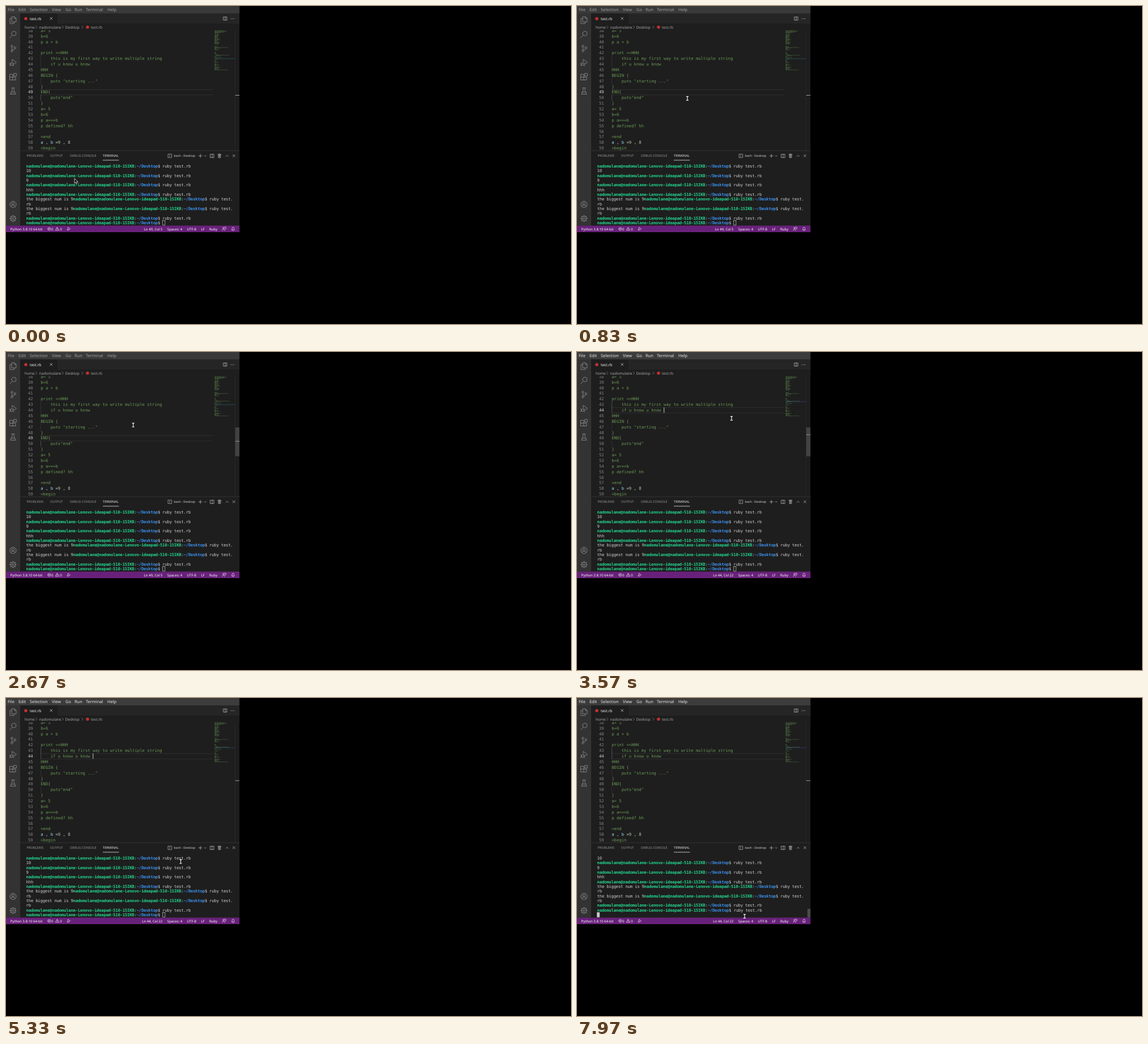
An HTML page that plays this animation: 998x561 px, repeating every 8 s.

```html
<!DOCTYPE html>
<html lang="en">
<head>
<meta charset="utf-8">
<title>Editor session</title>
<style>
  html, body { margin: 0; width: 100%; height: 100%; overflow: hidden; background: #000; }
  svg { display: block; width: 998px; height: 561px; }
  text { white-space: pre; text-rendering: geometricPrecision; font-family: "Noto Sans", sans-serif; }
  .mono { font-family: "DejaVu Sans Mono", monospace; font-size: 7.28px; }
  .term { letter-spacing: -0.225px; fill: #ccc; }
  .icon { fill: none; stroke-linecap: round; stroke-linejoin: round; }
</style>
</head>
<body>
<svg id="stage" viewBox="0 0 998 561"></svg>
<script>
const LOOP = 8000;
const USER = "nadomulane";
const stage = document.getElementById("stage");

function el(tag, attrs = {}, parent = stage) {
  const node = document.createElementNS("http://www.w3.org/2000/svg", tag);
  for (const key in attrs) node.setAttribute(key, attrs[key]);
  return parent.appendChild(node);
}
const group = (parent = stage) => el("g", {}, parent);
const rect = (x, y, width, height, fill, parent) => el("rect", { x, y, width, height, fill }, parent);
const path = (d, stroke, width = 0.6, parent = stage) =>
  el("path", { d, stroke, "stroke-width": width, class: "icon" }, parent);
function icon(x, y, d, stroke, width) {
  return el("path", { d, stroke, "stroke-width": width, class: "icon", transform: `translate(${x} ${y})` });
}
function label(x, y, string, size, fill, attrs = {}) {
  const node = el("text", { x, y, "font-size": size, fill, ...attrs });
  node.textContent = string;
  return node;
}
function mono(x, y, spans, parent, cls = "mono") {
  const node = el("text", { x, y, class: cls }, parent);
  for (const [string, fill, weight = 400] of spans)
    el("tspan", { fill, "font-weight": weight }, node).textContent = string;
  return node;
}
const ring = (x, y, r) => `M${x - r} ${y}a${r} ${r} 0 1 0 ${2 * r} 0a${r} ${r} 0 1 0 ${-2 * r} 0`;

// ---- Editor ----
const FIRST = 38, ROW = 9.876, CHAR = 4.383, LEFT = 61.2;
const GREEN = "#6a9955", BLUE = "#9cdcfe", PLAIN = "#d4d4d4", NUMBER = "#b5cea8";
const code = [
  "a= 5", "b=6", "p a + b", "", "print <<HHH",
  "    this is my first way to write multiple string", "    if u know u know ", "HHH",
  "BEGIN {", "    puts \"starting ...\"", "}", "END{", "    puts\"end\"", "}",
  "a= 5", "b=6", "p a===b", "p defined? hh", "", "=end", "a , b =9 , 8", "=begin"
];
const rowTop = n => 48.2 + (n - 39) * ROW;

rect(0, 0, 412.3, 399, "#1e1e1e");
const lineBox = path(`M${LEFT} .5H365M${LEFT} ${ROW}H365`, "#303032", 0.9);

const guide = n => path(`M61.6 ${rowTop(n)}v${ROW}`, "#404040", 0.6);
const guides = { 43: guide(43), 44: guide(44), 47: guide(47), 50: guide(50) };

const numbers = {};
code.forEach((string, i) => {
  const n = FIRST + i, y = rowTop(n) + 7.5;
  numbers[n] = mono(39, y, [[n, "inherit"]]);
  const spans = n === 58
    ? [["a", BLUE], [" , ", PLAIN], ["b", BLUE], [" =", PLAIN], ["9", NUMBER], [" , ", PLAIN], ["8", NUMBER]]
    : [[string, GREEN]];
  mono(LEFT, y, spans);
});
const caret = rect(LEFT + 21 * CHAR, rowTop(44) + 0.2, 1, ROW - 0.4, "#c8c8c6");

// ---- Minimap and ruler ----
let seed = 11;
const random = () => (seed = (seed * 16807) % 2147483647) / 2147483647;
const mapTop = n => 42.6 + (n - 1) * 1.04;
const mapLine = rect(368.5, 0, 36, 0.9, "#28515a");
for (let n = 1; n <= 68; n++) {
  const string = code[n - FIRST];
  const blank = n === 7 || (n > 24 && n < 28) || (n > 34 && n < 38) || n === 62;
  const length = string !== undefined ? string.trim().length
    : blank ? 0 : n < 5 ? 30 + random() * 22 : n === 30 || n === 68 ? 46 : 6 + random() * 16;
  const indent = string && string[0] === " " ? 4 : 0;
  if (length) el("path", {
    d: `M${368.5 + indent * 0.52} ${mapTop(n) + 0.5}h${length * 0.52}`,
    stroke: GREEN, "stroke-width": 0.75, "stroke-dasharray": "2.4 .5 1.3 .4", opacity: 0.6
  });
}
path("M404.6 43V255", "#333338", 0.6);
const ruler = rect(405, 0, 7.3, 1, "#a0a0a0");
const editorBar = rect(405, 133, 7.3, 51, "rgba(121,121,121,.4)");

// ---- Title, tabs and breadcrumbs ----
const titleBar = rect(0, 0, 412.3, 13, "#3c3c3c");
const menu = [["File", 3], ["Edit", 22], ["Selection", 42], ["View", 81], ["Go", 105],
  ["Run", 121], ["Terminal", 141], ["Help", 179]]
  .map(([string, x]) => label(x, 9.2, string, 7.4, "#ccc"));

rect(25, 13, 387.3, 18.2, "#252526");
rect(25, 13, 66, 18.2, "#1e1e1e");
rect(25, 31.2, 387.3, 11.4, "#1e1e1e");
const fileDot = (x, y) => el("circle", { cx: x, cy: y, r: 2.8, fill: "#c1302f" });
fileDot(35, 22.2);
label(42, 24.6, "test.rb", 6.6, "#fff");
path("M77.8 20l4 4m0-4l-4 4", "#ddd", 0.7);
path("M384.2 19.3h6v5.6h-6zM387.2 19.3v5.6", "#c5c5c5", 0.7);
for (const x of [397.4, 400, 402.6]) el("circle", { cx: x, cy: 22.3, r: 0.6, fill: "#c5c5c5" });
[["home", 33], [USER, 58.8], ["Desktop", 104.5], ["test.rb", 150]]
  .forEach(([string, x]) => label(x, 39.5, string, 6.5, "#a9a9a9"));
for (const x of [52.6, 99.2, 133.8]) path(`M${x} 35l2.2 2.3l-2.2 2.3`, "#a0a0a0", 0.6);
fileDot(144, 37.2);

// ---- Activity bar ----
rect(0, 13, 25, 374.4, "#333");
const ACT = "#858585";
[
  [25, "M-2 -6h4.5l3 3v6h-7.5zM2.5 -6v3h3M-2 -3h-3.5v9h7.5v-3"],
  [50, ring(1.5, -1.5, 4) + "M-1.5 1.5l-4 4.5"],
  [75, ring(-2, -4.2, 1.7) + ring(-2, 4.4, 1.7) + ring(3.4, -1.4, 1.7) + "M-2 -2.5V2.7M3.4 .3q0 2-5.4 2"],
  [100, "M-1.5 -1V-6L6 -.5L1 3.2" + ring(-2.3, 2.6, 2.3) + "M-6 .5l1.6 1M-6 3h1.3M-5.8 5.5l1.5-1M1.3 .5l-1.6 1M1.3 5.5l-1.6-1"],
  [125, "M-5.5 -4.5h5v5h5v5h-10zM-5.5 .5h5v5M1.5 -6h4.5v4.5h-4.5z"],
  [150, "M-2.5 -5.5h5M-1.5 -5.5v4l-3.2 7h9.4l-3.2-7v-4M-3.2 2h6.4"],
  [350, ring(0, 0, 5.6) + ring(0, -1.4, 2.2) + "M-3.8 4q.8-3 3.8-3t3.8 3"],
  [375, ring(0, 0, 1.7) + ring(0, 0, 4.1)]
].forEach(([y, d]) => icon(12.4, y, d, ACT, 0.95));
for (let a = 0; a < 360; a += 45)
  el("path", { d: "M0 -4.2v-1.6", stroke: ACT, "stroke-width": 1.8, transform: `translate(12.4 375) rotate(${a})` });

// ---- Panel ----
rect(25, 255, 387.3, 132.4, "#1e1e1e");
path("M25 255.2H412.3", "#414141", 0.6);
[["PROBLEMS", 36.5], ["OUTPUT", 78], ["DEBUG CONSOLE", 113], ["TERMINAL", 171]]
  .forEach(([string, x], i) => label(x, 266.2, string, 5.7, i === 3 ? "#e7e7e7" : "#969696"));
rect(171, 271.6, 28.4, 0.8, "#e7e7e7");
const hover = el("rect", { x: 284, y: 258.8, width: 53, height: 11.2, rx: 1.5, fill: "#303133" });
path("M286.5 261.2h6.2v6.2h-6.2zM288.4 262.8l1.7 1.5l-1.7 1.5", "#c5c5c5", 0.65);
label(296.5, 266.3, "bash - Desktop", 5.4, "#d0d0d0");
path("M340.3 264.4h6M343.3 261.4v6M350.3 263.8l1.5 1.5l1.5-1.5" +
  "M361 261.4h6.2v6h-6.2zM364.1 261.4v6" +
  "M374.3 262h5.6M376 262v-1h2.2v1M375 262l.3 5.6h3.6l.3-5.6M376.5 263.4v2.8M377.8 263.4v2.8" +
  "M388.4 265.4l2.2-2.2l2.2 2.2M400.5 262.2l4 4m0-4l-4 4", "#c5c5c5", 0.7);

// ---- Terminal ----
const T_LEFT = 35.6, T_CHAR = 4.158, T_ROW = 8.317, T_BASE = 285.1;
const rows = group();
const prompt = [
  [`${USER}@${USER}-Lenovo-ideapad-510-15IKB`, "#23d18b", 700],
  [":", "#ccc"], ["~/Desktop", "#3b8eea", 700], ["$ ", "#ccc"]
];
const out = string => [[string, "#ccc"]];
const run = [...prompt, ["ruby test.rb", "#ccc"]];
const biggest = [["the biggest num is 9", "#ccc"], ...prompt, ["ruby test.", "#ccc"]];
const rowNodes = [run, out("10"), run, out("9"), run, out("hhh"), run,
  biggest, out("rb"), biggest, out("rb"), run, prompt]
  .map((spans, i) => mono(T_LEFT, T_BASE + i * T_ROW, spans, rows, "mono term"));
const lastY = T_BASE + 12 * T_ROW;
const command = mono(T_LEFT + 58 * T_CHAR, lastY, out("ruby test.rb"), rows, "mono term");
const block = el("rect", { y: lastY - 6.5, width: T_CHAR, height: 7.9, "stroke-width": 0.7, stroke: "#ccc" });
const termBar = rect(407, 372, 5.3, 15.4, "#4b4b4b");

// ---- Status bar ----
rect(0, 387.4, 412.3, 11.6, "#68217a");
const status = (x, string, attrs) => label(x, 395.5, string, 6.1, "#fff", attrs);
status(7.5, "Python 3.8.10 64-bit");
status(80, "0");
status(95.3, "0");
path(ring(76.3, 393.2, 2.6) + "M75.2 392.1l2.2 2.2m0-2.2l-2.2 2.2" +
  "M90.6 390.4l3 5.2h-6zM90.6 392.2v1.6" +
  "M109.5 392.4v-2l4 2.8l-2.2 1.6" + ring(109.3, 394.6, 1.2), "#fff", 0.6);
const position = status(276.6, "", { "text-anchor": "end" });
[["Spaces: 4", 284.8], ["UTF-8", 319.6], ["LF", 344.5], ["Ruby", 359]]
  .forEach(([string, x]) => status(x, string));
path(ring(384.2, 391.8, 1.3) + "M382 396q.3-2.2 2.2-2.2t2.2 2.2M385.6 390.2h2.8v3h-1.2l-1 1" +
  "M398.6 395h5l-.8-1.3v-1.6q0-1.9-1.7-1.9t-1.7 1.9v1.6zM400.4 396h1.4", "#fff", 0.6);

// ---- Pointer ----
const pointer = group();
const shapes = {
  arrow: el("path", { d: "M0 0V8.6L2 6.8L3.3 9.8L4.8 9.1L3.5 6.3H6.2Z", fill: "#111", stroke: "#fff", "stroke-width": 0.7 }, pointer),
  beam: path("M-1.6 -3.4q1.6 0 1.6 .9q0-.9 1.6-.9M-1.6 3.4q1.6 0 1.6-.9q0 .9 1.6 .9M0 -2.6V2.6", "#fff", 1.1, pointer),
  hand: el("path", {
    d: "M-.8 .2q.8-.8 1.4 0v3l3.4.8q1 .4.8 1.6l-.8 3.4h-4l-2.8-3.2q0-1 1-.8l1 .7z",
    fill: "#fff", stroke: "#111", "stroke-width": 0.4
  }, pointer)
};

// time, x, y
const track = [
  [0, 121, 304], [120, 121, 304], [830, 195, 163], [1670, 210, 147], [2500, 222, 138],
  [3000, 232, 104], [3250, 232, 104], [3570, 273, 117], [4000, 308, 259], [4430, 311, 265],
  [5150, 311, 267], [5820, 298, 387], [6050, 296, 385], [LOOP, 296, 385]
];
function pointerAt(t) {
  const i = track.findIndex(key => key[0] > t);
  const [t0, x0, y0] = track[i - 1], [t1, x1, y1] = track[i];
  const u = (t - t0) / (t1 - t0), k = u * u * (3 - 2 * u);
  return [x0 + (x1 - x0) * k, y0 + (y1 - y0) * k];
}
function pointerShape(t, y) {
  if (t < 450) return "arrow";
  if (y < 255) return "beam";
  if (y > 258 && y < 271) return "hand";
  return y > 275 && y < 387 ? "beam" : "arrow";
}

const CLICK = 3150, TERM_FOCUS = 6500, RECALL = 7200, ENTER = 7880;
const ramp = (t, start, length) => Math.min(1, Math.max(0, (t - start) / length));
const show = (node, on) => node.setAttribute("visibility", on ? "visible" : "hidden");

function draw(t) {
  const focused = t >= CLICK, line = focused ? 44 : 49;
  const inTerm = t >= TERM_FOCUS, entered = t >= ENTER, recalled = t >= RECALL;

  titleBar.setAttribute("fill", focused ? "#3c3c3c" : "#393939");
  menu.forEach(node => node.setAttribute("fill", focused ? "#e8e8e8" : "#a0a0a0"));
  lineBox.setAttribute("transform", `translate(0 ${rowTop(line)})`);
  for (const n in numbers) numbers[n].setAttribute("fill", +n === line ? "#d6d6d6" : "#858585");
  for (const n in guides)
    guides[n].setAttribute("stroke", (focused ? n < 45 : +n === 50) ? "#707070" : "#404040");
  show(caret, focused && !inTerm && (t - CLICK) % 1000 < 500);
  mapLine.setAttribute("y", mapTop(line));
  mapLine.setAttribute("fill", focused ? "#283f70" : "#28515a");
  ruler.setAttribute("y", focused ? 145.3 : 157);
  editorBar.setAttribute("opacity", ramp(t, 860, 100) * (1 - ramp(t, 3900, 800)));
  position.textContent = focused ? "Ln 44, Col 22" : "Ln 49, Col 5";

  rows.setAttribute("transform", `translate(0 ${entered ? -T_ROW : 0})`);
  show(rowNodes[0], !entered);
  show(command, recalled);
  block.setAttribute("x", T_LEFT + T_CHAR * (entered ? 0 : recalled ? 70 : 58));
  block.setAttribute("fill", inTerm ? "#ccc" : "none");
  termBar.setAttribute("opacity", ramp(t, 5420, 100));

  const [x, y] = pointerAt(t), shape = pointerShape(t, y);
  pointer.setAttribute("transform", `translate(${x} ${y})`);
  for (const name in shapes) show(shapes[name], name === shape);
  show(hover, shape === "hand");
}

const start = performance.now();
function tick() {
  draw((performance.now() - start) % LOOP);
  requestAnimationFrame(tick);
}
tick();
</script>
</body>
</html>
```
